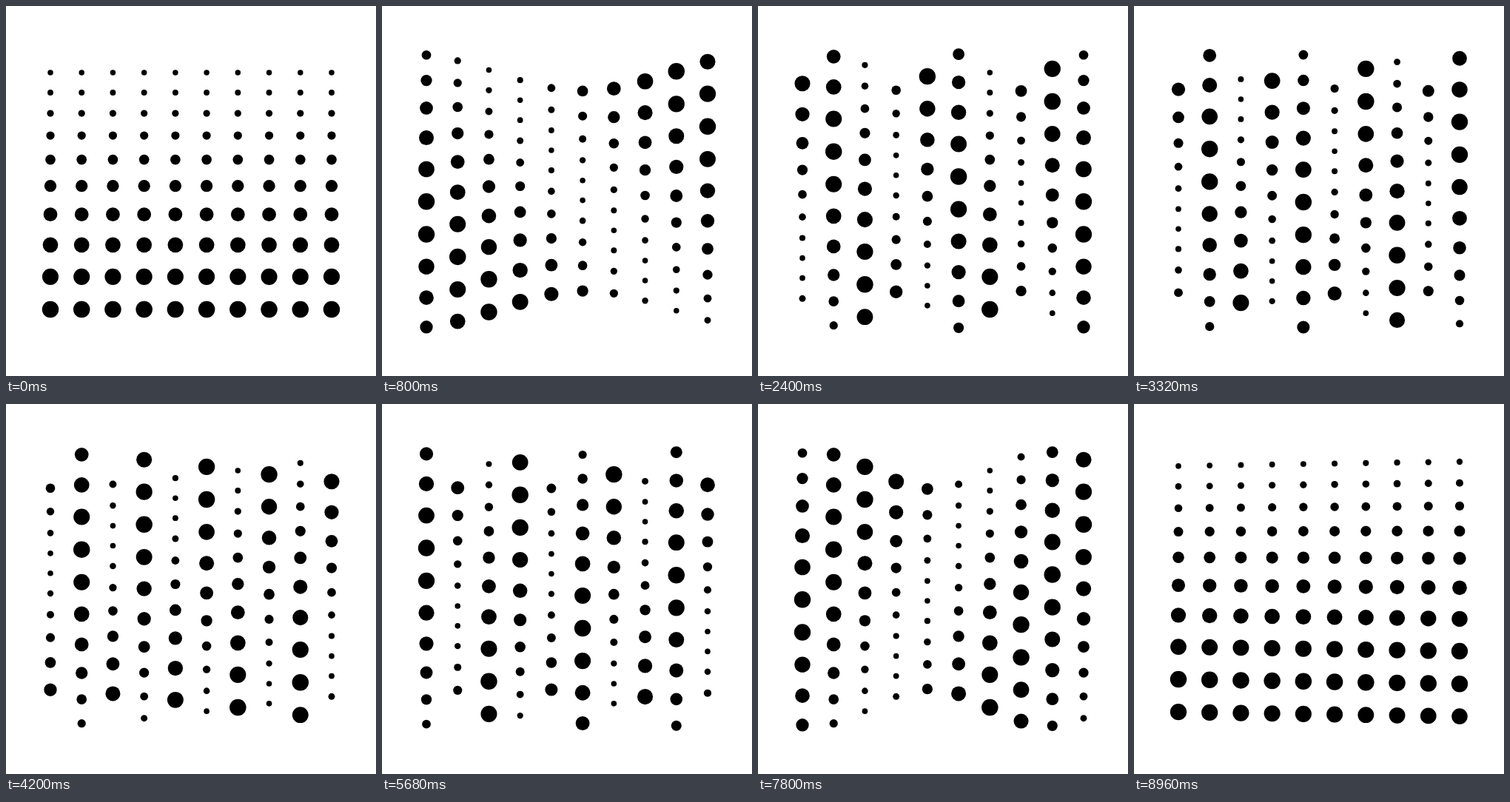
An HTML page for the animation above (9000 ms loop, 500 px wide and 500 px high).

```html
<!DOCTYPE html>
<html lang="en">
<head>
<meta charset="utf-8">
<title>Dot wave</title>
<style>
  html, body { margin: 0; width: 100%; height: 100%; overflow: hidden; background: #fff; }
  svg { display: block; width: 100%; height: 100%; }
</style>
</head>
<body>
<svg id="stage" viewBox="0 0 500 500"></svg>
<script>
  const LOOP = 9000, STEP = 40;
  const COLS = 10, ROWS = 10;
  const SWING = 25, MID_RADIUS = 7.5, RADIUS_RANGE = 3.75;

  const stage = document.getElementById('stage');
  const dots = [];

  for (let col = 0; col < COLS; col++) {
    for (let row = 0; row < ROWS; row++) {
      const el = document.createElementNS('http://www.w3.org/2000/svg', 'circle');
      el.setAttribute('cx', 60 + col * 380 / (COLS - 1));
      stage.append(el);
      dots.push({
        el,
        y: 90 + row * 320 / (ROWS - 1),
        cycles: 9 + col, // each column completes one more cycle per loop than the last
        lag: Math.PI * row / (ROWS - 1)
      });
    }
  }

  function draw(ms) {
    const turn = 2 * Math.PI * ms / LOOP;
    for (const { el, y, cycles, lag } of dots) {
      const angle = cycles * turn - lag;
      el.setAttribute('cy', y + SWING * Math.sin(angle));
      el.setAttribute('r', MID_RADIUS - RADIUS_RANGE * Math.cos(angle));
    }
  }

  function tick() {
    const ms = performance.now() % LOOP;
    draw(Math.floor(ms / STEP) * STEP);
    requestAnimationFrame(tick);
  }

  draw(0);
  requestAnimationFrame(tick);
</script>
</body>
</html>
```
